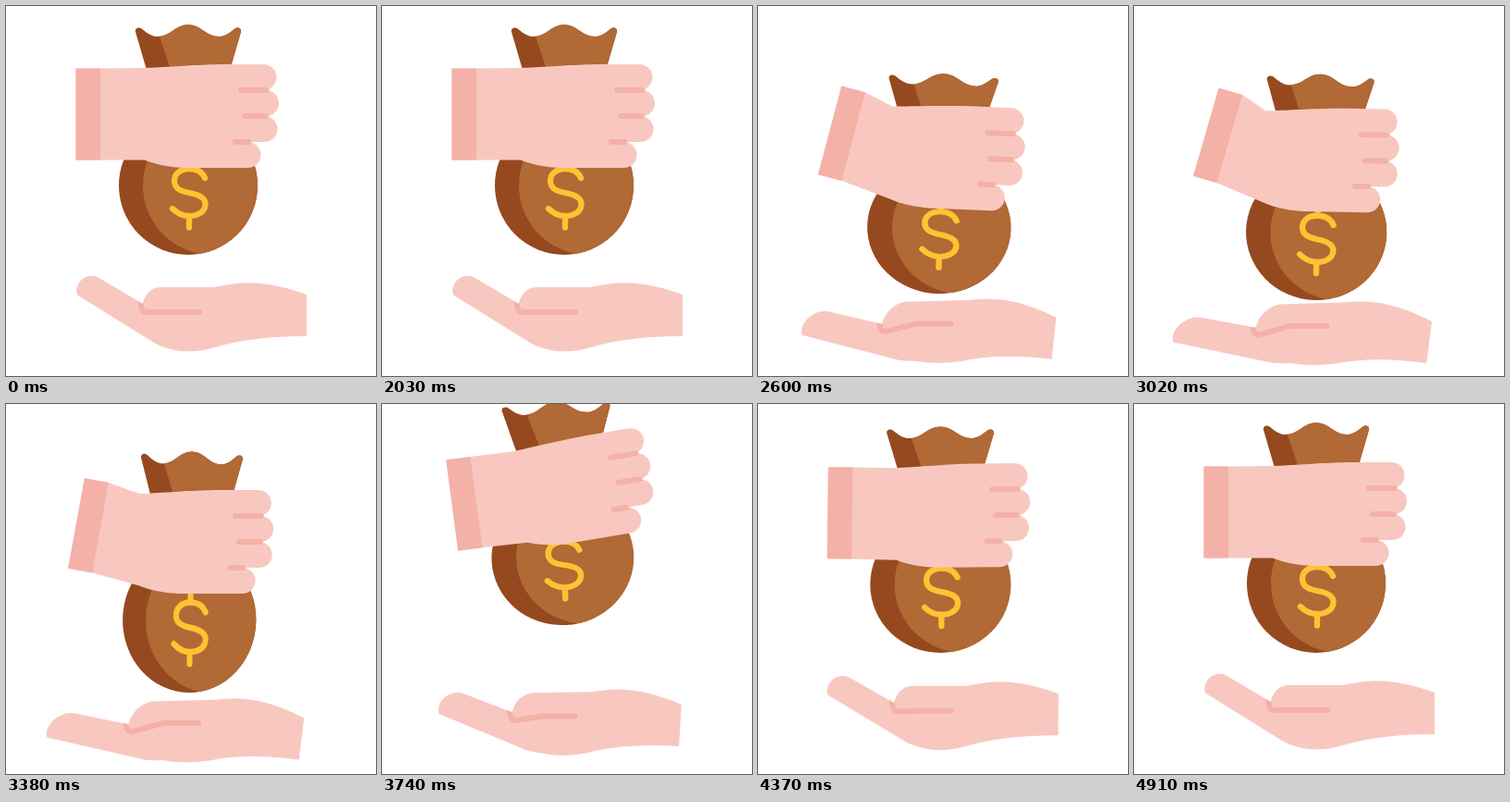
Recreate the animation shown at these times as an HTML page with a canvas. Size 400 by 400 pixels, loop 4940 ms.

```html
<!DOCTYPE html>
<html lang="en">
<head>
<meta charset="utf-8">
<title>Handing over a money bag</title>
<style>
html, body { margin: 0; width: 100%; height: 100%; overflow: hidden; background: #fff; }
canvas { display: block; width: 400px; height: 400px; }
</style>
</head>
<body>
<canvas id="stage" width="400" height="400"></canvas>
<script>
const ctx = document.getElementById('stage').getContext('2d');
const LOOP = 4940, HOLD = 2030, STEP = 30;
const SKIN = '#f8c8c0', SHADE = '#f4b1a8', BROWN = '#b16935', DARK = '#96491f', GOLD = '#ffc233';

// lift, turn: the fist; drop, sway, squash: the bag; low: how far the palm sinks
const REST = { lift: 0, turn: 0, drop: 0, sway: 0, squash: 0, low: 0 };
const POSES = [
  { ...REST, t: HOLD },
  { t: 2600, lift: 43, turn: 2.5, drop: 42, sway: -3.5, squash: -.044, low: .9 },
  { t: 3000, lift: 47, turn: 1, drop: 49, sway: -2, squash: -.02, low: 1.06 },
  { t: 3380, lift: 30, turn: 0, drop: 43, sway: 0, squash: .048, low: 1 },
  { t: 3640, lift: -21, turn: -9, drop: -27, sway: 1, squash: 0, low: .66 },
  { t: 3740, lift: -22, turn: -9.5, drop: -30, sway: 1.5, squash: -.03, low: .47 },
  { t: 4010, lift: 4, turn: -2, drop: 0, sway: 1, squash: -.036, low: .18 },
  { ...REST, t: 4700 }
];

const rad = d => d * Math.PI / 180;
const mix = (a, b, k) => a + (b - a) * k;
const clamp = k => Math.min(1, Math.max(0, k));

// Smooth interpolation that never overshoots its poses
function tangent(i, key) {
  const [a, b, c] = [POSES[i - 1], POSES[i], POSES[i + 1]];
  if (!a || !c) return 0;
  const before = (b[key] - a[key]) / (b.t - a.t), after = (c[key] - b[key]) / (c.t - b.t);
  return before * after <= 0 ? 0 : 2 * before * after / (before + after);
}

function poseAt(t) {
  const i = POSES.findLastIndex(p => p.t <= t);
  const a = POSES[i], b = POSES[i + 1];
  if (!b) return REST;
  const h = b.t - a.t, u = (t - a.t) / h, w = 1 - u, out = {};
  for (const key in REST) {
    out[key] = mix(a[key], b[key], u * u * (3 - 2 * u))
      + h * u * w * (tangent(i, key) * w - tangent(i + 1, key) * u);
  }
  return out;
}

function spin([x, y], cx, cy, deg) {
  const c = Math.cos(rad(deg)), s = Math.sin(rad(deg));
  return [cx + (x - cx) * c - (y - cy) * s, cy + (x - cx) * s + (y - cy) * c];
}

function arc(cx, cy, r, from = -90, to = 90) {
  return Array.from({ length: 21 }, (_, i) => {
    const a = rad(mix(from, to, i / 20));
    return [cx + r * Math.cos(a), cy + r * Math.sin(a)];
  });
}

// Cubic curve as a list of points
function curve(a, b, c, d) {
  return Array.from({ length: 21 }, (_, i) => {
    const k = i / 20, w = 1 - k;
    return [0, 1].map(n => w * w * w * a[n] + 3 * w * w * k * b[n] + 3 * w * k * k * c[n] + k * k * k * d[n]);
  });
}

function trace(pts, warp) {
  ctx.beginPath();
  for (const p of pts) ctx.lineTo(...warp(p));
}

function fill(pts, warp, color) {
  trace(pts, warp);
  ctx.closePath();
  ctx.fillStyle = color;
  ctx.fill();
}

function crease(pts, warp) {
  trace(pts, warp);
  ctx.strokeStyle = SHADE;
  ctx.lineWidth = 6;
  ctx.lineCap = ctx.lineJoin = 'round';
  ctx.stroke();
}

const CUFF = [[75.5, 67.5], [102, 67.5], [102, 166.5], [75.5, 166.5]];
const FIST = [
  CUFF[0], CUFF[1],
  ...curve([150, 67], [175, 66], [210, 63], [240, 63]),
  ...arc(278.5, 77, 14), ...arc(281, 105, 14), ...arc(279.5, 133, 14), ...arc(261.5, 161, 14),
  ...curve([195, 175], [177, 174.5], [162, 171.5], [150, 166.5]),
  CUFF[2], CUFF[3]
];
const KNUCKLES = [[254, 281.5, 91], [258, 281, 119], [248, 262, 147]];

const PALM = [
  ...arc(92.5, 308, 16.2, 165, 302),
  ...curve([148, 322], [150, 311], [157, 304], [168, 304]),
  ...curve([226, 304], [250, 299], [275, 294], [325, 312]),
  ...curve([325, 357], [285, 357], [252, 361], [222, 370]),
  ...curve([222, 370], [200, 376], [178, 374], [160, 364])
];
const PALM_LINE = [...curve([145.5, 320], [146, 328], [148, 331], [152, 331]), [178, 331], [209, 331]];

function drawFist({ lift, turn }) {
  // The wrist folds so that the cuff tilts with the height of the fist
  const bend = .345 * lift - turn;
  const warp = p => {
    const folded = spin(p, 178, 143, bend * clamp((150 - p[0]) / 48));
    const [x, y] = spin(folded, 185, 120, turn);
    return [x - .56 * bend, y + lift];
  };
  fill(FIST, warp, SKIN);
  fill(CUFF, warp, SHADE);
  for (const [x1, x2, y] of KNUCKLES) crease([[x1, y], [x2, y]], warp);
}

function drawPalm({ low }) {
  // Fingers stretch out and sink to the left, the wrist tips to the right
  const warp = ([x, y]) => {
    const right = Math.max(0, x - 212);
    const dx = -.24 * Math.max(0, 212 - x) - .0011 * right * (y - 290);
    const dy = 14 + .34 * Math.max(0, 178 - x) + .12 * right;
    return [x + dx * low, y + dy * low];
  };
  ctx.save();
  fill(PALM, warp, SKIN);
  ctx.clip();
  crease(PALM_LINE, warp);
  ctx.restore();
}

const neck = new Path2D(`M146 24 C150 27 155 32 162 33 C178 34 182 20.3 197 20.3
  C212 20.3 216 34 232 33 C239 32 244 27 248 24 C251 22.5 255 24 254 28
  L240 76 L232 150 L164 150 L154 76 L140 28 C139 24 143 22.5 146 24Z`);
const neckLight = new Path2D('M163 15 H260 V150 H182 L177 66 L166 33Z');
const body = new Path2D();
body.arc(197, 194, 75, 0, 7);
const bodyLight = new Path2D();
bodyLight.arc(223, 194, 75, 0, 7);
const dollar = new Path2D(`M215 186 C212 179 206 176 198 176 C188 176 182 182 182 189
  C182 197 188 200 198 202 C210 204 215.5 208 215.5 214 C215.5 222 208 227 198 227
  C190 227 185 224 180 219 M198 176 V164 M198 227 V239.5`);

function shaded(shape, light) {
  ctx.save();
  ctx.fillStyle = DARK;
  ctx.fill(shape);
  ctx.clip(shape);
  ctx.fillStyle = BROWN;
  ctx.fill(light);
  ctx.restore();
}

function drawBag({ lift, turn, drop, sway, squash }) {
  ctx.save();
  ctx.translate(197 + sway, 269 + drop);
  ctx.rotate(rad(.2 * turn + .03 * lift));
  ctx.scale(1 - .8 * squash, 1 + squash);
  ctx.translate(-197, -269);
  shaded(neck, neckLight);
  shaded(body, bodyLight);
  ctx.strokeStyle = GOLD;
  ctx.lineWidth = 6.3;
  ctx.lineCap = ctx.lineJoin = 'round';
  ctx.stroke(dollar);
  ctx.restore();
}

const start = performance.now();

function frame(now) {
  const t = Math.max(0, now - start) % LOOP;
  const pose = poseAt(HOLD + Math.max(0, Math.floor((t - HOLD) / STEP)) * STEP);
  ctx.fillStyle = '#fff';
  ctx.fillRect(0, 0, 400, 400);
  drawPalm(pose);
  drawBag(pose);
  drawFist(pose);
  requestAnimationFrame(frame);
}
frame(start);
</script>
</body>
</html>
```
